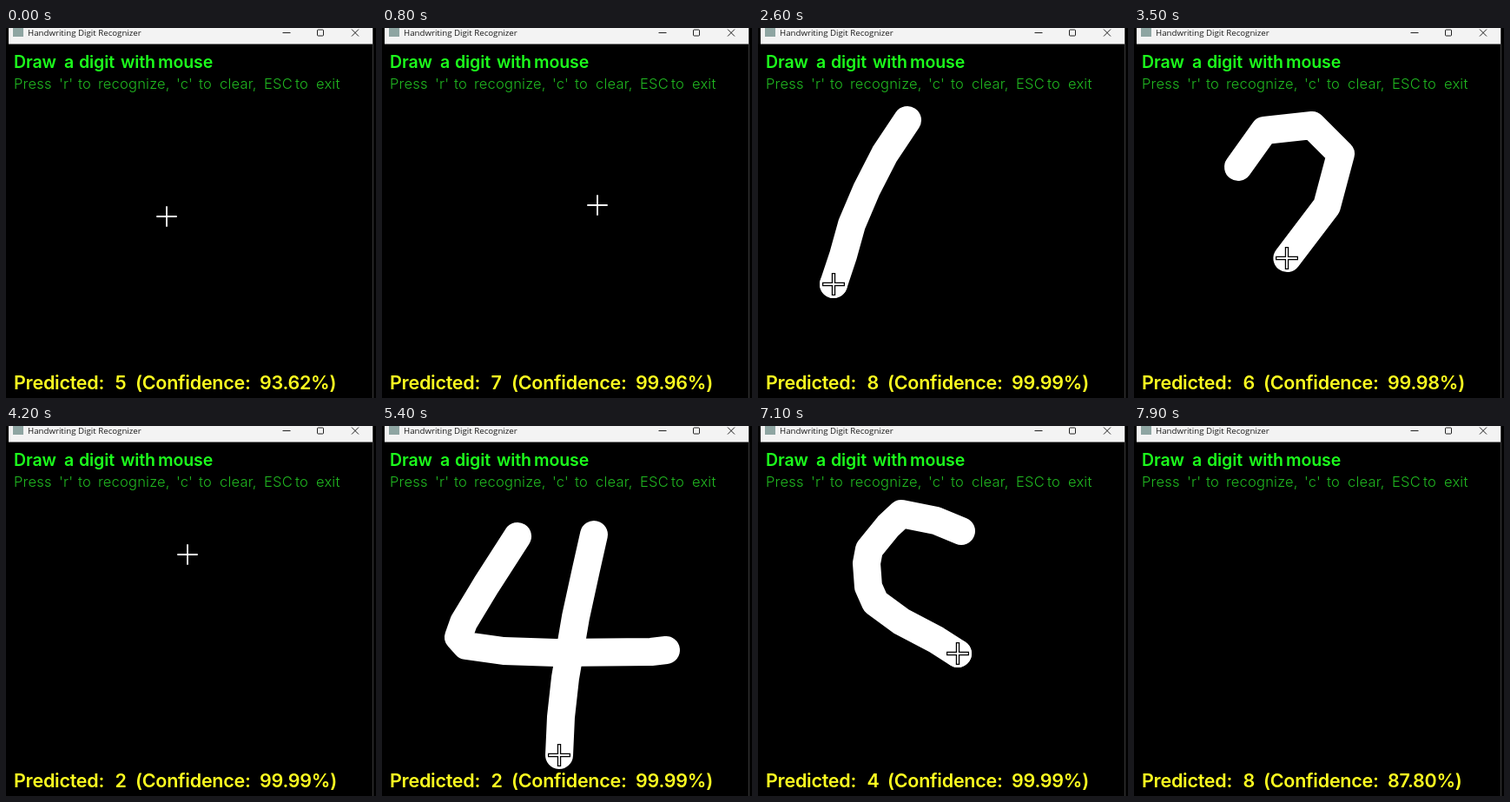
Write an HTML page that moves like this. It is 426 px wide and 426 px high and loops after 8 s.

```html
<!DOCTYPE html>
<html lang="en">
<head>
<meta charset="utf-8">
<title>Handwriting Digit Recognizer</title>
<style>
  html, body { margin: 0; width: 100%; height: 100%; overflow: hidden; background: #000; }
  svg { display: block; width: 100vw; height: 100vh; }
  text { font-family: Inter, "Open Sans", sans-serif; }
  .caption { font: 9.7px "Open Sans", "Noto Sans", sans-serif; fill: #1c1c1c; }
  .title { font-size: 19.5px; font-weight: 600; fill: #1cff1c; letter-spacing: -.1px; }
  .help { font-size: 16.5px; font-weight: 300; fill: #20b820; letter-spacing: .2px; }
  .result { font-size: 21.5px; font-weight: 600; fill: #ffff20; letter-spacing: -.25px; }
  .buttons { fill: none; stroke: #222; stroke-width: 1; }
  #ink { fill: none; stroke: #fff; stroke-width: 32; stroke-linecap: round; stroke-linejoin: round; }
</style>
</head>
<body>
<svg viewBox="0 0 426 426">
  <rect width="426" height="426"/>
  <g id="ink"></g>

  <rect x="3" width="419" height="18.5" fill="#f3f3f3"/>
  <path d="M422.5 0V426" stroke="#3c3c3c"/>
  <rect x="8" width="12" height="10" fill="#8ea5a2"/>
  <text class="caption" x="25" y="9">Handwriting Digit Recognizer</text>
  <path class="buttons" d="M318.5 5.5h9M398 1.5l8 8M406 1.5l-8 8"/>
  <rect class="buttons" x="358.5" y="2" width="7" height="7" rx="1"/>

  <text class="title" y="45.5">
    <tspan x="9">Draw</tspan> <tspan x="67">a</tspan> <tspan x="84">digit</tspan>
    <tspan x="132">with</tspan> <tspan x="175">mouse</tspan>
  </text>
  <text class="help" y="70">
    <tspan x="9">Press</tspan> <tspan x="61">'r'</tspan> <tspan x="83">to</tspan>
    <tspan x="106">recognize,</tspan> <tspan x="196">'c'</tspan> <tspan x="222">to</tspan>
    <tspan x="246">clear,</tspan> <tspan x="297">ESC</tspan> <tspan x="333">to</tspan>
    <tspan x="357">exit</tspan>
  </text>
  <text class="result" y="416">
    <tspan x="9">Predicted:</tspan> <tspan x="125.5" id="digit">5</tspan>
    <tspan x="149">(Confidence:</tspan> <tspan x="292" id="score">93.62%)</tspan>
  </text>

  <g id="cursor">
    <path d="M-13 0H13M0 -13V13" stroke="#000" stroke-width="4.4"/>
    <path d="M-11.7 0H11.7M0 -11.7V11.7" stroke="#fff" stroke-width="1.8"/>
  </g>
</svg>
<script>
const LOOP = 8000, STEP = 100;
const $ = id => document.getElementById(id);

// start, end, time of clearing, pen path
const strokes = [
  [200, 500, 800, '130,132 200,128 272,130 240,205 212,290 196,370'],
  [900, 1600, 2000, '265,149 225,147 190,147 158,153 151,172 158,205 173,235 192,262 222,286 255,310 272,328 272,350 257,373 230,387 185,389 112,376 97,367 95,350 102,335 120,314 155,289 195,264 225,243 248,215 265,190 281,169'],
  [2300, 2600, 3200, '172,106 146,145 125,186 108,226 98,262 87,295'],
  [2600, 2900, 3200, '87,295 90,335 112,370 160,382 205,360 208,318 165,292 115,312'],
  [3300, 3700, 4000, '120,160 150,118 205,112 238,145 222,205 165,280 108,350 190,345 290,345'],
  [4500, 4900, 5900, '156,127 120,183 94,226 88,243 97,253 140,259 200,261 310,260 327,258'],
  [5100, 5400, 5900, '244,125 235,165 223,220 211,290 206,335 204,379'],
  [6700, 7100, 7800, '234,121 205,109 165,101 150,115 128,142 125,158 127,185 135,203 165,225 205,246 230,262'],
  [7100, 7500, 7800, '230,262 262,290 274,325 250,365 205,375 172,350 180,312 215,270 246,210 250,160 236,125']
].map(([start, end, clear, points]) => {
  const line = document.createElementNS('http://www.w3.org/2000/svg', 'polyline');
  line.setAttribute('points', points);
  $('ink').append(line);
  return { start, end, clear, line, length: line.getTotalLength() };
});

const results = [
  [0, '5', '93.62'], [600, '7', '99.96'], [1800, '8', '99.99'], [3000, '6', '99.98'],
  [3900, '2', '99.99'], [5700, '4', '99.99'], [7700, '8', '87.80']
];

// Pointer stops with the pen up, joined with the stroke ends
const stops = [[0, 185, 217], [4200, 209, 148], [6000, 411, 215], [7800, 400, 300]];
for (const s of strokes) {
  const a = s.line.getPointAtLength(0), b = s.line.getPointAtLength(s.length);
  stops.push([s.start, a.x, a.y], [s.end, b.x, b.y]);
}
stops.sort((a, b) => a[0] - b[0]);

const progress = (t, a, b) => Math.min(1, Math.max(0, (t - a) / (b - a)));

function pointer(t) {
  const s = strokes.find(s => t >= s.start && t < s.end);
  if (s) return s.line.getPointAtLength(s.length * progress(t, s.start, s.end));
  const i = stops.findLastIndex(p => p[0] <= t);
  const a = stops[i], b = stops[i + 1] || a;
  const k = a === b ? 0 : progress(t, a[0], b[0]);
  return { x: a[1] + (b[1] - a[1]) * k, y: a[2] + (b[2] - a[2]) * k };
}

function draw() {
  const t = Math.floor(performance.now() % LOOP / STEP) * STEP;
  for (const s of strokes) {
    s.line.style.display = t >= s.start && t < s.clear ? '' : 'none';
    s.line.style.strokeDasharray = t >= s.end ? 'none' : `${s.length * progress(t, s.start, s.end)} 9999`;
  }
  const [, digit, score] = results.findLast(r => r[0] <= t);
  $('digit').textContent = digit;
  $('score').textContent = `${score}%)`;
  const { x, y } = pointer(t);
  $('cursor').setAttribute('transform', `translate(${Math.round(x)} ${Math.round(y)})`);
  $('cursor').style.display = t < 7900 ? '' : 'none';
  requestAnimationFrame(draw);
}
draw();
</script>
</body>
</html>
```
